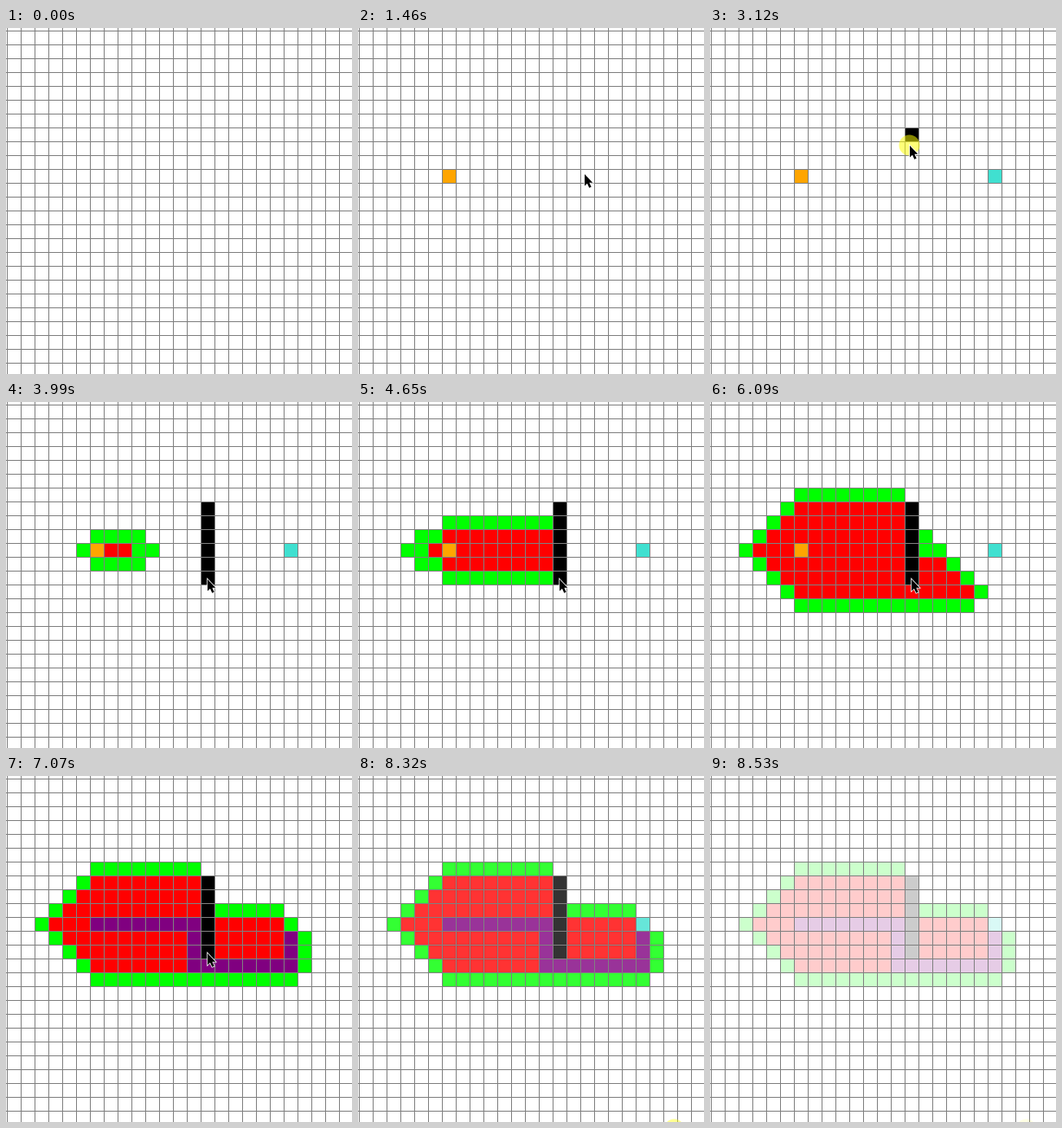
These frames come from a looping animation (400x400 px, 8.6 s). An HTML page with a canvas:

```html
<!DOCTYPE html>
<html lang="en">
<head>
<meta charset="utf-8">
<title>Path search on a grid</title>
<style>
  html, body { margin: 0; width: 100%; height: 100%; overflow: hidden; background: #fff; }
  canvas { display: block; }
</style>
</head>
<body>
<canvas id="stage" width="400" height="400"></canvas>
<script>
const ctx = document.getElementById('stage').getContext('2d');
const STAGE = 400, LOOP = 8600, SIZE = 16, LEFT = 1, TOP = 3;
const TICK = 46.66, STEP = 29.16, SEARCH_START = 3885;
const FADE_START = 8220, FADE_STEP = 77;
const GREY = '#808080', WALL = '#000', OPEN = '#00ff00', CLOSED = '#ff0000';
const PATH = '#800080', START = '#ffa500', END = '#40e0d0';

const start = { x: 6, y: 10 }, end = { x: 20, y: 10 };
const wall = { x: 14, first: 7, last: 12 };

// Pointer: one eased move per gesture, and the times the button is down
const entry = { x: 248, y: 354 };
const moves = [
  { from: 30, until: 800, x: 109, y: 176 },
  { from: 1040, until: 1460, x: 262, y: 169 },
  { from: 1640, until: 1860, x: 335, y: 174 },
  { from: 2240, until: 2330, x: 205, y: 174 },
  { from: 2530, until: 2890, x: 230, y: 130 },
  { from: 3080, until: 3120, x: 231, y: 136 },
  { from: 3140, until: 3720, x: 233, y: 205 },
  { from: 7500, until: 7680, x: 366, y: 409 }
];
const presses = [
  { from: 900, until: 1040 },
  { from: 1860, until: 2060 },
  { from: 2890, until: 3760 },
  { from: FADE_START, until: LOOP }
];

const key = c => c.x + ',' + c.y;
const isWall = c => c.x === wall.x && c.y >= wall.first && c.y <= wall.last;
const clamp = (v, min, max) => Math.max(min, Math.min(max, v));
const ease = p => p * p * (3 - 2 * p);

// A* search; returns every recolouring with the step at which it shows
function search() {
  const events = [], from = new Map(), cost = new Map([[key(start), 0]]);
  const paint = (step, cell, color) => events.push({ step, cell, color });
  const guess = c => Math.abs(c.x - end.x) + Math.abs(c.y - end.y);
  const queue = [{ cell: start, f: guess(start), order: 0 }];
  let order = 0, step = 0;
  while (queue.length) {
    queue.sort((a, b) => a.f - b.f || a.order - b.order);
    let { cell } = queue.shift();
    step++;
    if (key(cell) === key(end)) {
      while ((cell = from.get(key(cell)))) paint(step++, cell, PATH);
      paint(step, end, END);
      break;
    }
    for (const [dx, dy] of [[1, 0], [-1, 0], [0, 1], [0, -1]]) {
      const next = { x: cell.x + dx, y: cell.y + dy }, id = key(next);
      const g = cost.get(key(cell)) + 1;
      if (isWall(next) || g >= (cost.get(id) ?? Infinity)) continue;
      cost.set(id, g);
      from.set(id, cell);
      queue.push({ cell: next, f: g + guess(next), order: ++order });
      paint(step, next, OPEN);
    }
    if (cell !== start) paint(step + 1, cell, CLOSED);
  }
  return events.sort((a, b) => a.step - b.step);
}
const events = search();

function cursorAt(t) {
  let { x, y } = entry;
  for (const m of moves) {
    const e = ease(clamp((t - m.from) / (m.until - m.from), 0, 1));
    x += (m.x - x) * e;
    y += (m.y - y) * e;
  }
  return { x, y };
}

function drawCells(t) {
  const cells = new Map();
  const put = (cell, color) => cells.set(key(cell), { cell, color });
  if (t >= 900) put(start, START);
  if (t >= 1900) put(end, END);
  if (t >= 2900) {
    // The wall follows the pointer one tick late
    const row = Math.floor((cursorAt(Math.min(t, SEARCH_START) - TICK).y - TOP) / SIZE);
    const last = clamp(row, wall.first, wall.last);
    for (let y = wall.first; y <= last; y++) put({ x: wall.x, y }, WALL);
  }
  // The screen refreshes once per tick, the search runs a little faster
  const tick = SEARCH_START + Math.floor((t - SEARCH_START) / TICK) * TICK;
  const step = Math.floor(1 + (tick - SEARCH_START) / STEP);
  for (const e of events) {
    if (e.step > step) break;
    put(e.cell, e.color);
  }
  for (const { cell, color } of cells.values()) {
    ctx.fillStyle = color;
    ctx.fillRect(LEFT + cell.x * SIZE, TOP + cell.y * SIZE, SIZE, SIZE);
  }
}

function drawGrid() {
  ctx.fillStyle = GREY;
  for (let x = LEFT; x < STAGE; x += SIZE) ctx.fillRect(x, 0, 1, STAGE);
  for (let y = TOP; y < STAGE; y += SIZE) ctx.fillRect(0, y, STAGE, 1);
}

const arrow = new Path2D('M0 0V13.5L3 10.8L5.3 15.8L7.7 14.8L5.4 9.8H9.3Z');

function drawCursor(t) {
  if (t < moves[0].from) return;
  const { x, y } = cursorAt(t);
  if (presses.some(p => t >= p.from && t < p.until)) {
    ctx.fillStyle = 'rgba(255,255,0,.53)';
    ctx.beginPath();
    ctx.arc(x - 0.5, y - 0.5, 12, 0, Math.PI * 2);
    ctx.fill();
  }
  ctx.save();
  ctx.translate(Math.round(x), Math.round(y));
  ctx.strokeStyle = '#fff';
  ctx.lineWidth = 1.5;
  ctx.stroke(arrow);
  ctx.fillStyle = '#000';
  ctx.fill(arrow);
  ctx.restore();
}

function draw(t) {
  ctx.globalAlpha = 1;
  ctx.fillStyle = '#fff';
  ctx.fillRect(0, 0, STAGE, STAGE);

  // Stepped fade back to the empty grid
  const fade = clamp(1 - 0.2 * Math.floor((t - FADE_START) / FADE_STEP), 0.2, 1);
  ctx.globalAlpha = fade;
  drawCells(t);
  ctx.globalAlpha = 1;
  drawGrid();
  ctx.globalAlpha = fade;
  drawCursor(t);
}

const begin = performance.now();
function frame() {
  draw((performance.now() - begin) % LOOP);
  requestAnimationFrame(frame);
}
frame();
</script>
</body>
</html>
```
